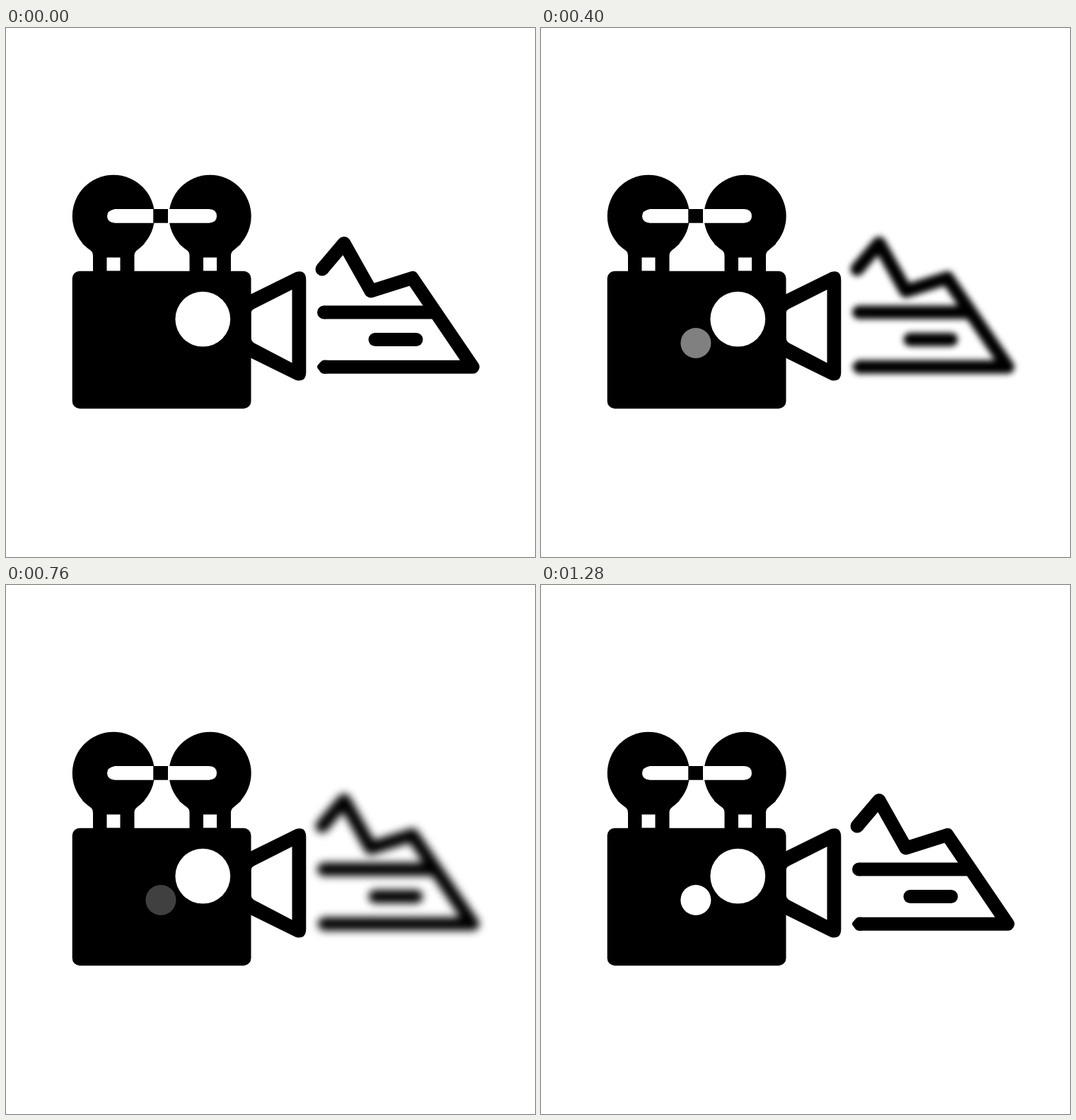
Write an HTML page that moves like this. It is 748 px wide and 748 px high and loops after 2000 ms.

```html
<!DOCTYPE html>
<html lang="en">
<head>
<meta charset="utf-8">
<title>Film camera</title>
<style>
  html, body { margin: 0; width: 100%; height: 100%; overflow: hidden; background: #fff; }
  svg { display: block; width: 100vw; height: 100vh; }
  .line { fill: none; stroke: #000; stroke-width: 19; stroke-linejoin: round; }
</style>
</head>
<body>
<svg viewBox="0 0 748 748">
  <defs>
    <filter id="soft" filterUnits="userSpaceOnUse" x="415" y="274" width="278" height="235" color-interpolation-filters="sRGB">
      <feGaussianBlur id="blur" stdDeviation="0"/>
    </filter>
    <g id="reel">
      <circle cx="152" cy="266" r="58.2"/>
      <path d="M117 312Q123 316 123 322V346H181.500V322Q181.500 317 185 314.500L196 305L152 280L108 305Z"/>
      <path fill="#fff" d="M142.500 324.500H161.500V343.500H142.500Z"/>
    </g>
  </defs>

  <g id="scene">
    <path class="line" d="M447 341L478 304.500L516 372L574.500 353.500L660 479.300H449"/>
    <path class="line" d="M447 341h.01M449.500 402h.01" stroke-linecap="round"/>
    <path class="line" d="M449.500 402H604"/>
    <path class="line" d="M522 440.500H580" stroke-linecap="round"/>
    <path d="M454 469.800H449Q447 469.800 445 472L440.500 477Q439.500 479 440.500 481L445 487Q446.500 488.800 449 488.800H454Z"/>
  </g>

  <use href="#reel"/>
  <use href="#reel" x="136.500"/>
  <path fill="#fff" d="M208.500 256H154Q143 258 143 266Q143 274.500 154 275.700H208.500ZM229 256H287Q298 256.500 298 266Q298 275 287 275.700H229Z"/>
  <path d="M208.500 256H229V275.700H208.500Z"/>
  <rect x="93.700" y="343.700" width="252.800" height="194.500" rx="10.500"/>
  <path fill-rule="evenodd" d="M345 377L410 345Q424 341 424.300 356V487Q424 501 410 498L345 466ZM404.500 370L351 397Q346.500 399 346.500 404V437Q346.500 443 351 445.500L404.500 473.500Z"/>
  <circle cx="278.300" cy="411.700" r="38.900" fill="#fff"/>
  <circle id="lamp" cx="218.900" cy="445.500" r="21.500" fill="#fff" opacity="0"/>
</svg>
<script>
  const LOOP = 2000, STEP = 40;
  // [step, value] pairs, linear in between
  const lampKeys = [[0, 0], [4, 1], [8, 0], [12, 1], [18, 0], [22, 1], [28, 0], [32, 1]];
  const blurKeys = [[0, 0], [6, 8.2], [14, 0], [17, 5.7], [18, 6], [22, 4.8], [25, 0]];

  const scene = document.getElementById('scene');
  const blur = document.getElementById('blur');
  const lamp = document.getElementById('lamp');

  function valueAt(keys, s) {
    const i = keys.findIndex(k => k[0] > s);
    if (i < 0) return keys[keys.length - 1][1];
    const [s0, v0] = keys[i - 1], [s1, v1] = keys[i];
    return v0 + (v1 - v0) * (s - s0) / (s1 - s0);
  }

  const start = performance.now();

  function draw() {
    const time = Math.max(0, performance.now() - start) % LOOP;
    const step = Math.floor(time / STEP);
    const sigma = valueAt(blurKeys, step);
    lamp.setAttribute('opacity', valueAt(lampKeys, step));
    blur.setAttribute('stdDeviation', sigma);
    scene.setAttribute('filter', sigma > 0 ? 'url(#soft)' : 'none');
    requestAnimationFrame(draw);
  }
  draw();
</script>
</body>
</html>
```
